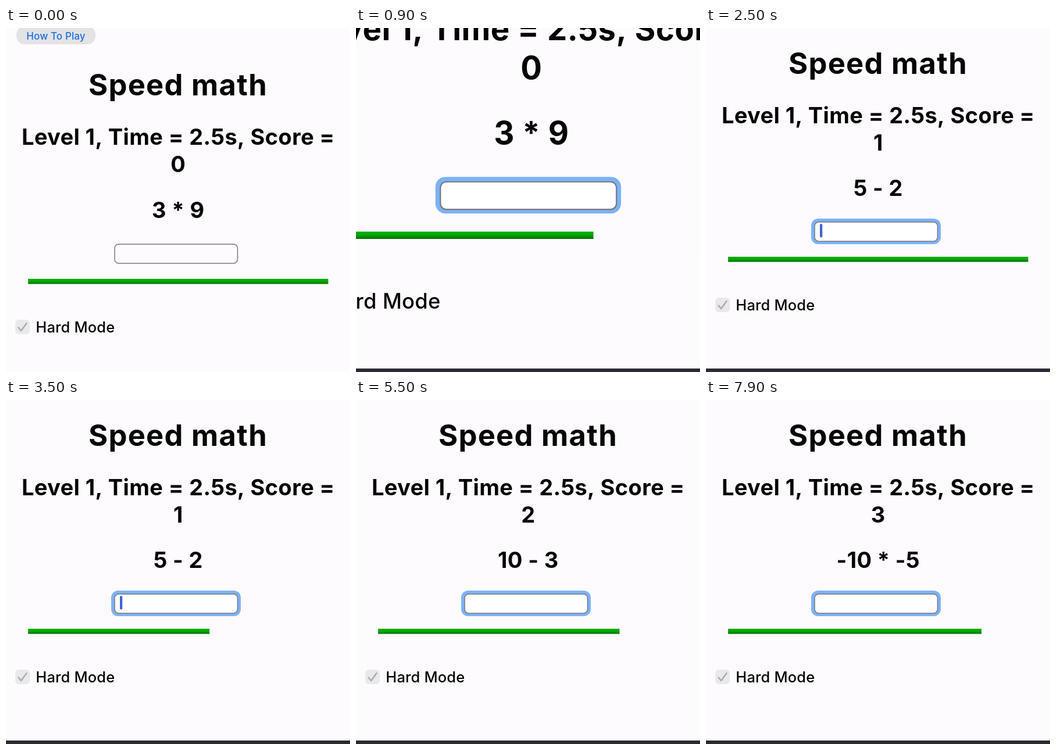
These frames come from a looping animation (592x592 px, 8000 ms). An HTML page with a canvas:

```html
<!DOCTYPE html>
<html lang="en">
<head>
<meta charset="utf-8">
<title>Speed math</title>
<style>
  html, body { margin: 0; width: 100%; height: 100%; overflow: hidden; background: #fdfbfd; }
  canvas { display: block; }
</style>
</head>
<body>
<canvas id="stage" width="592" height="592"></canvas>
<script>
const ctx = document.getElementById('stage').getContext('2d');
const LOOP = 8000, ROUND = 2500;
const BACKGROUND = '#fdfbfd';

// Each round: the question, the answer and the times its digits are typed.
const rounds = [
  { question: '3 * 9', answer: '27', typed: [950, 1200] },
  { question: '5 - 2', answer: '3', typed: [3900] },
  { question: '10 - 3', answer: '7', typed: [6200] },
  { question: '-10 * -5', answer: '', typed: [] }
];
const keyTimes = [0, ...rounds.flatMap(r => r.typed)];

// Camera: time, scale, x, y
const camera = [
  [0, 1, 0, 38],
  [400, 1.45, -128, -222],
  [850, 1.45, -128, -222],
  [1300, 0.955, 24.5, 13.5],
  [1800, 1, 0, 0]
];

const clamp = v => Math.min(1, Math.max(0, v));
const ramp = (t, from, to) => clamp((t - from) / (to - from));
const ease = u => u * u * (3 - 2 * u);

function cameraAt(t) {
  const i = camera.findIndex(k => k[0] > t);
  if (i < 0) return camera[camera.length - 1].slice(1);
  const a = camera[i - 1], b = camera[i];
  const u = ease(ramp(t, a[0], b[0]));
  return a.slice(1).map((v, j) => v + (b[j + 1] - v) * u);
}

function box(x, y, w, h, r, fill) {
  ctx.beginPath();
  ctx.roundRect(x, y, w, h, r);
  ctx.fillStyle = fill;
  ctx.fill();
}

function text(str, x, y, size, { weight = 450, align = 'center', color = '#050405', spacing = 0.01 } = {}) {
  ctx.font = `${weight} ${size}px Inter, "Open Sans", sans-serif`;
  ctx.letterSpacing = size * spacing + 'px';
  ctx.textAlign = align;
  ctx.fillStyle = color;
  ctx.fillText(str, x, y);
}

const heading = (str, y) => text(str, 296.3, y, 38, { weight: 700 });

function drawInput(t, value) {
  const focus = ramp(t, 100, 300);
  ctx.globalAlpha = focus;
  box(181, 328, 223, 44, 12, '#7db2f6');
  ctx.globalAlpha = 1;
  box(187, 334, 211.5, 33, 7, focus ? '#fff' : BACKGROUND);
  ctx.lineWidth = 1.5;
  ctx.strokeStyle = '#79777c';
  ctx.stroke();
  text(value, 196, 356, 16.9, { align: 'left' });

  const lastKey = Math.max(...keyTimes.filter(k => k <= t));
  if (t >= 200 && (t - lastKey) % 1000 < 500) {
    // The caret trails behind while the page zooms out.
    const lag = ramp(t, 900, 1300) * (1 - ramp(t, 1300, 1700));
    const x = 196 + (value ? ctx.measureText(value).width - 1.5 : 0) + 8 * lag;
    box(x, 337 + 17 * lag, 4.2, 23.5, 2, '#3c62df');
  }
}

function drawBar(elapsed) {
  const green = ctx.createLinearGradient(0, 394, 0, 402.5);
  green.addColorStop(0, '#00a000');
  green.addColorStop(0.35, '#00b400');
  green.addColorStop(1, '#006c00');
  box(38, 393.8, 516.5 * (1 - Math.max(0, elapsed - 12) / ROUND), 8.7, 0, green);
}

function drawHardMode() {
  box(16, 464, 25, 25, 6, '#e9e8eb');
  ctx.beginPath();
  ctx.moveTo(21.5, 477.5);
  ctx.lineTo(26, 483);
  ctx.lineTo(35.5, 470);
  ctx.lineWidth = 2.5;
  ctx.lineCap = ctx.lineJoin = 'round';
  ctx.strokeStyle = '#aaa9ad';
  ctx.stroke();
  text('Hard Mode', 51.3, 486, 25.3, { align: 'left' });
}

function drawPage(t) {
  const index = Math.floor(t / ROUND);
  const { question, answer, typed } = rounds[index];
  const value = answer.slice(0, typed.filter(k => k <= t).length);

  box(18, -41, 136, 31, 14, '#e3e2e5');
  text('How To Play', 86, -18, 16.9, { weight: 500, color: '#176fe0' });
  text('Speed math', 296, 78.5, 50.7, { weight: 700, spacing: 0.025 });
  heading('Level 1, Time = 2.5s, Score =', 163.5);
  heading(index, 210.5);
  heading(question, 289);
  drawInput(t, value);
  drawBar(t % ROUND);
  drawHardMode();
  text('by tamsin from 2D', 296, 611, 25.3);
}

function draw(t) {
  ctx.setTransform(1, 0, 0, 1, 0, 0);
  box(0, 0, 592, 592, 0, BACKGROUND);

  const [scale, x, y] = cameraAt(t);
  ctx.setTransform(scale, 0, 0, scale, x, y);
  drawPage(t);
  ctx.setTransform(1, 0, 0, 1, 0, 0);

  // Scroll indicators
  ctx.globalAlpha = ramp(t, 900, 1050) * (1 - ramp(t, 1900, 2300));
  box(582.5, -6, 5, 391, 2.5, '#777579');
  box(54.5, 522.5, 483.5, 5, 2.5, '#777579');
  ctx.globalAlpha = 1;

  // Top edge of the keyboard
  box(0, 592 - 6 * ramp(t, 420, 520), 592, 6, 0, '#2c2a32');
}

function frame() {
  draw(performance.now() % LOOP);
  requestAnimationFrame(frame);
}
frame();
</script>
</body>
</html>
```
